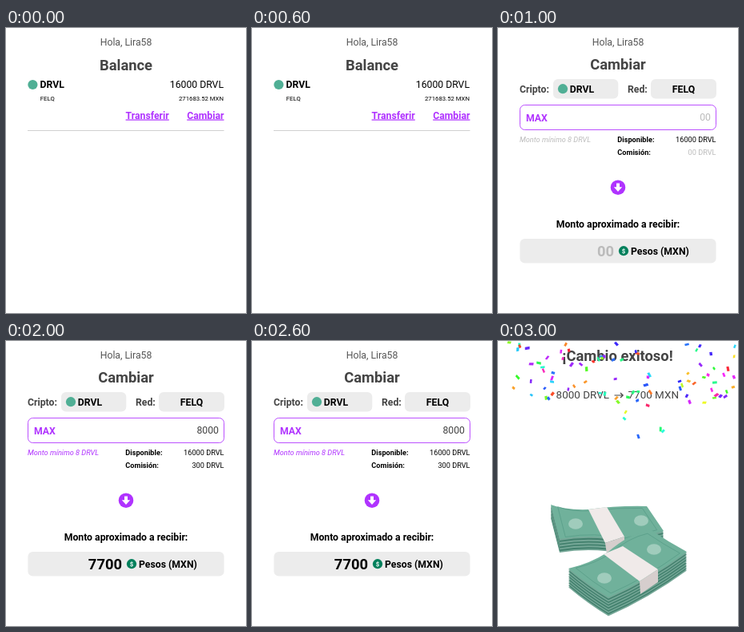
Animation of 300 by 357 pixels, one loop 4000 ms. Source, as an HTML page:

```html
<!DOCTYPE html>
<html lang="es">
<head>
<meta charset="utf-8">
<title>Cambio</title>
<style>
html, body { margin: 0; width: 100%; height: 100%; overflow: hidden; background: #fff; }
svg { display: block; width: 100vw; height: 100vh; }
text { font-family: Roboto, Arial, sans-serif; }
</style>
</head>
<body>
<svg id="stage" viewBox="0 0 300 357"></svg>
<script>
const USER = 'Lira58', COIN = 'DRVL', CHAIN = 'FELQ';
const PURPLE = '#b033ff', DARK = '#444', FAINT = '#bbb', PANEL = '#ececec', COIN_GREEN = '#50af95';
const SMALL = 7.75, NOTE = 9.18, BODY = 12.24, SUM = 13.46, TITLE = 18.37;
const LEFT = 27, RIGHT = 272.5, MID = 150;
const STEP = 1000;

const text = (s, x, y, size, { anchor = 'start', fill = '#000', bold, italic, link } = {}) =>
  `<text x="${x}" y="${y}" font-size="${size}" text-anchor="${anchor}" fill="${fill}"` +
  `${bold ? ' font-weight="700"' : ''}${italic ? ' font-style="italic"' : ''}` +
  `${link ? ' text-decoration="underline"' : ''}>${s}</text>`;
const circle = (x, y, r, fill) => `<circle cx="${x}" cy="${y}" r="${r}" fill="${fill}"/>`;
const box = (x, y, w, h, fill, extra = '') =>
  `<rect x="${x}" y="${y}" width="${w}" height="${h}" rx="6" fill="${fill}" ${extra}/>`;
const path = (d, fill, extra = '') => `<path d="${d}" fill="${fill}" ${extra}/>`;

const header = (title, y) =>
  text('Hola, ' + USER, MID, 22.2, BODY, { anchor: 'middle', fill: '#555' }) +
  text(title, MID, y, TITLE, { anchor: 'middle', fill: DARK, bold: true });

function balance() {
  const link = { anchor: 'end', fill: PURPLE, bold: true, link: true };
  return header('Balance', 52.5) +
    circle(33.4, 71, 6.1, COIN_GREEN) +
    text(COIN, 42.5, 75.4, BODY, { bold: true }) +
    text('16000 ' + COIN, 272, 75.4, BODY, { anchor: 'end' }) +
    text(CHAIN, 42.8, 91.4, SMALL) +
    text('271683.52 MXN', 272, 91.4, SMALL, { anchor: 'end' }) +
    text('Transferir', 203.8, 113.5, BODY, link) +
    text('Cambiar', RIGHT, 113.5, BODY, link) +
    path(`M${LEFT} 128.5H${RIGHT}`, 'none', 'stroke="#d0d0d0"');
}

function exchange(amount, fee, result, filled) {
  const shade = (on, off = FAINT) => ({ anchor: 'end', fill: filled ? on : off });
  const label = { fill: DARK, bold: true };
  return header('Cambiar', 51.6) +
    text('Cripto:', LEFT, 80.5, BODY, label) +
    box(69, 64, 81.3, 24.4, PANEL) +
    circle(81, 76.2, 6.1, COIN_GREEN) +
    text(COIN, 89.8, 80.5, BODY, { bold: true }) +
    text('Red:', 162, 80.5, BODY, label) +
    box(191, 64, 82, 24.4, PANEL) +
    text(CHAIN, 232, 80.5, BODY, { anchor: 'middle', bold: true }) +
    box(27.5, 96.5, 245, 31, '#fff', `stroke="${PURPLE}" stroke-opacity=".85"`) +
    text('MAX', 35, 116.5, BODY, { fill: PURPLE, bold: true }) +
    text(amount, 266, 116.3, BODY, shade(DARK)) +
    text('Monto mínimo 8 ' + COIN, LEFT, 142.5, NOTE, { fill: filled ? PURPLE : FAINT, italic: true }) +
    text('Disponible:', 149.3, 142.5, NOTE, { bold: true }) +
    text('16000 ' + COIN, RIGHT, 142.5, NOTE, shade('#000', '#000')) +
    text('Comisión:', 149.3, 159, NOTE, { bold: true }) +
    text(`${fee} ${COIN}`, RIGHT, 159, NOTE, shade('#000')) +
    circle(MID, 199.7, 9.3, PURPLE) +
    path('M148 194.5h4v4.7h3.2L150 205l-5.2-5.8h3.2z', '#fff') +
    text('Monto aproximado a recibir:', MID, 250, BODY, { anchor: 'middle', bold: true }) +
    box(27.4, 264, 245.2, 30.4, PANEL) +
    text(result, 145, 285.5, TITLE, { ...shade('#000'), bold: true }) +
    circle(157, 279.2, 6.1, '#00805c') +
    text('$', 157, 282, SMALL, { anchor: 'middle', fill: '#fff', bold: true }) +
    text('Pesos (MXN)', 166, 283.6, BODY, { bold: true });
}

// A stack of notes: the rim repeats downwards as paper edges, the face lies on top.
function bundle({ rim, far, sheets, gap, cx, cy, spread, rise }) {
  const face = `${rim} ${far}z`;
  let s = '';
  for (let i = sheets; i > 0; i--)
    s += path(face, i % 2 ? '#75a797' : '#42806d', `transform="translate(0 ${i * gap})"`);
  s += path(face, '#70b19b') +
    path(face, 'none', `stroke="#559a85" stroke-width=".8" transform="translate(${cx} ${cy}) scale(.88) translate(${-cx} ${-cy})"`);
  for (const k of [-1, 1])
    s += `<ellipse cx="${cx + k * spread}" cy="${cy + k * rise}" rx="9" ry="6.7" fill="#a0ccbc"/>`;
  return s;
}

const band = (top, side) => path(top, '#f0eae9') + path(side, '#d6cecd');

const money = () =>
  bundle({
    rim: 'M66 205L77 248Q118 241 160 250L207 238', far: 'L186 207Q150 206 113 211 84 212 66 205',
    sheets: 9, gap: 1.9, cx: 138, cy: 227, spread: 41, rise: -2
  }) +
  band('M113 211L136 208 158 245 134 253z', 'M134 253L158 245V258L136 267z') +
  bundle({
    rim: 'M88 285Q113 306 138 321 188 299 236 264', far: 'Q212 251 190 236 163 242 138 264 115 279 88 285',
    sheets: 13, gap: 1.8, cx: 164, cy: 279, spread: 31, rise: -18
  }) +
  band('M132 267L156 257 200 286 177 301z', 'M177 301L200 286V302L178 317z');

// Pieces fall furthest right of the middle.
function confetti() {
  let seed = 23, s = '';
  const rnd = () => (seed = seed * 16807 % 2147483647) / 2147483647;
  for (let i = 0; i < 90; i++) {
    const x = 14 + 282 * rnd();
    const y = rnd() * (72 + 58 * Math.exp(-(((x - 192) / 45) ** 2)));
    const w = 3.5 + rnd() * 2.5, h = 2.4 + rnd();
    s += `<rect x="${-w / 2}" y="${-h / 2}" width="${w}" height="${h}" fill="hsl(${rnd() * 360} 95% 57%)" ` +
      `transform="translate(${x} ${y}) rotate(${rnd() * 180}) skewX(${rnd() * 30 - 15})"/>`;
  }
  return s;
}

const success = () =>
  text('¡Cambio exitoso!', 149.5, 25, TITLE, { anchor: 'middle', fill: DARK, bold: true }) +
  text('8000 ' + COIN, 72.6, 72.3, SUM, { fill: DARK }) +
  path('M145.5 68H156M153 65l3.2 3-3.2 3', 'none', `stroke="${DARK}" stroke-width="1.2"`) +
  text('7700 MXN', 226, 72.3, SUM, { anchor: 'end', fill: DARK }) +
  money() + confetti();

const stage = document.getElementById('stage');
const scenes = [
  balance(),
  exchange('00', '00', '00', false),
  exchange('8000', '300', '7700', true),
  success()
];
stage.innerHTML = scenes.map(s => `<g>${s}</g>`).join('');
const groups = [...stage.children];

function draw(ms) {
  const now = Math.floor(ms / STEP) % groups.length;
  groups.forEach((g, i) => { g.style.display = i === now ? '' : 'none'; });
}

const start = performance.now();
function tick() {
  draw(performance.now() - start);
  requestAnimationFrame(tick);
}
tick();
</script>
</body>
</html>
```
